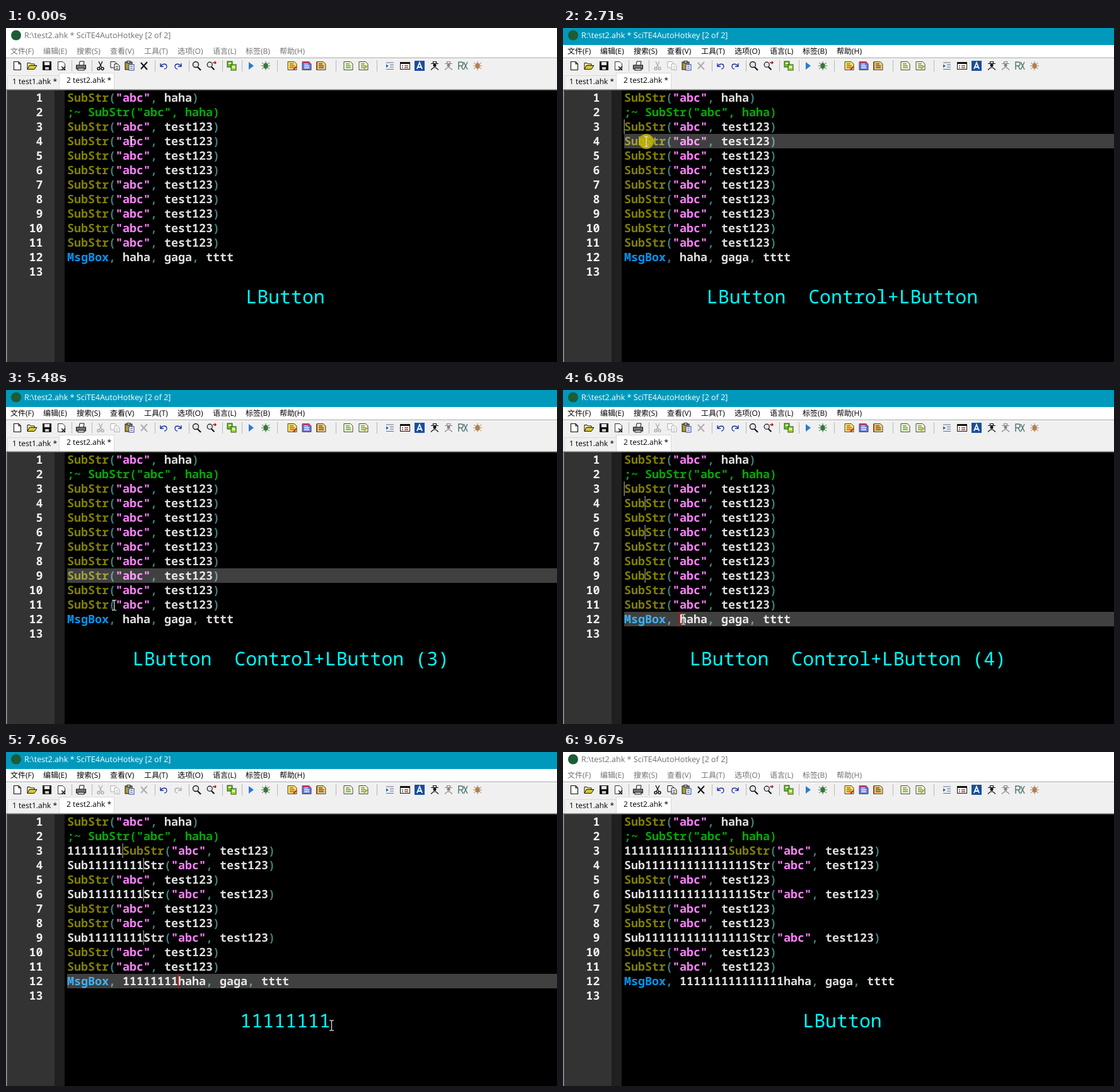
An HTML page for the animation above (9750 ms loop, 874 by 530 pixels).

```html
<!DOCTYPE html>
<html lang="zh-CN">
<head>
<meta charset="utf-8">
<title>Multi-caret editing</title>
<style>
  html, body { margin: 0; width: 100%; height: 100%; overflow: hidden; background: #000; }
  svg { display: block; width: 874px; height: 530px; }
  text { white-space: pre; text-rendering: geometricPrecision; }
  .ui { font: 12px "Open Sans", "Noto Sans CJK SC", "Noto Sans CJK", sans-serif; }
  .title { font-size: 12.55px; }
  .code { font: 600 18.333px "Noto Sans Mono", monospace; fill: #dedede; }
  .num { text-anchor: end; fill: #f0f0f0; }
  .label { font: 29.9px "Noto Sans Mono", monospace; fill: #0ff; text-anchor: middle; }
  .fn { fill: #808000; }
  .cmd { fill: #0095ee; }
  .str { fill: #ff80ff; }
  .op { fill: #408080; }
  .rem { fill: #00aa00; }
  #bar { fill: #fff; }
  #title, #menu { fill: #707070; }
  .active #bar { fill: #0099bc; }
  .active #title { fill: #fff; }
  .active #menu { fill: #000; }
  .edit { color: #111; }
  .undo, .redo { color: #1a2f9a; }
  .active .edit, .active.typed .redo { color: #acacac; }
</style>
</head>
<body>
<svg id="stage" viewBox="0 0 874 530">
  <rect width="874" height="530" fill="#000"/>
  <rect width="874" height="48" fill="#fff"/>
  <rect id="bar" width="874" height="27"/>
  <circle cx="16" cy="11.500" r="8" fill="#1d5c35"/>
  <text id="title" class="ui title" x="29" y="16">R:\test2.ahk * SciTE4AutoHotkey [2 of 2]</text>
  <g id="menu" class="ui"></g>
  <rect y="47" width="874" height="51" fill="#f0f0f0"/>
  <path d="M0 47.500H874" stroke="#a0a0a0"/>
  <path d="M0 48.500H874" stroke="#fff"/>
  <g id="tools"></g>
  <path d="M2.500 97V75.500H84.500V97" fill="#f0f0f0" stroke="#d9d9d9"/>
  <path d="M84.500 98V71.500H171.500V98" fill="#fff" stroke="#d9d9d9"/>
  <g class="ui">
    <text x="10" y="89">1 test1.ahk *</text>
    <text x="96" y="87">2 test2.ahk *</text>
  </g>
  <rect x="2" y="99" width="75" height="431" fill="#333"/>
  <rect x="77" y="99" width="16" height="431" fill="#202020"/>
  <path d="M.5 530V97.500H874" fill="none" stroke="#a0a0a0"/>
  <path d="M1.500 530V98.500H874" fill="none" stroke="#696969"/>
  <g id="code"></g>
  <rect id="row" x="97" width="777" height="23" fill="#fff" fill-opacity=".25"/>
  <g id="carets"></g>
  <text id="label" class="label" x="443" y="437"></text>
  <circle id="press" r="12" fill="#c4b800" fill-opacity=".85"/>
  <path id="mouse" d="M-3.500-8H-1L0-7L1-8H3.500M0-7V7M-3.500 8H-1L0 7L1 8H3.500" fill="none" stroke="#e8e8e8" stroke-width="1.200"/>
</svg>
<script>
const $ = id => document.getElementById(id);
const LOOP = 9750, ROW = 23, TOP = 99, LEFT = 97, CHAR = 11;

// [first, last, count]: runs of evenly spaced screen updates, on a 10 ms clock
const ticks = [[0, 0, 1], [200, 640, 4], [950, 950, 1], [1250, 1440, 2], [1760, 2710, 7],
  [2900, 3810, 7], [3970, 4470, 4], [4770, 5760, 7], [5930, 6840, 7], [7010, 8000, 7],
  [8150, 8300, 2], [8470, 8470, 1], [8800, 9290, 4], [9670, 9670, 1]
].flatMap(([a, b, n]) => Array.from({ length: n },
  (_, i) => Math.floor((a + (b - a) * i / Math.max(1, n - 1)) / 10) * 10));

// [time, x, y] of the mouse
const path = [[53, 199, 180], [640, 101, 154], [1100, 101, 154], [1440, 106, 181], [1600, 106, 181],
  [2390, 132, 180], [2900, 132, 180], [3650, 136, 226], [3970, 136, 226], [4300, 136, 304],
  [4470, 136, 290], [4770, 136, 290], [4930, 134, 295], [5100, 134, 295], [5590, 190, 364],
  [6230, 191, 364], [6690, 496, 402], [6840, 496, 402], [8000, 532, 458], [8150, 532, 495],
  [8470, 532, 495], [9120, 540, 516], [9280, 545, 550]];

// Each click adds a caret; held is how long the press marker shows
const clicks = [
  { at: 950, line: 3, col: 0, held: 0 },
  { at: 2550, line: 4, col: 3, held: 340 },
  { at: 3650, line: 6, col: 3, held: 310 },
  { at: 4930, line: 9, col: 3, held: 160 },
  { at: 5760, line: 12, col: 8, held: 160 }
];
const typeStart = ticks.indexOf(6840) - 3, typeMax = 15;

const call = 'SubStr("abc", test123)';
const source = ['SubStr("abc", haha)', ';~ SubStr("abc", haha)', ...Array(9).fill(call), 'MsgBox, haha, gaga, tttt', ''];

function tokenClass(s) {
  if (s[0] === ';') return 'rem';
  if (s[0] === '"') return 'str';
  if (s === 'SubStr') return 'fn';
  if (s === 'MsgBox') return 'cmd';
  return /^[(),]$/.test(s) ? 'op' : '';
}

const paint = line => line.split(/(;.*|"[^"]*"|SubStr|MsgBox|[(),])/).filter(Boolean)
  .map(s => `<tspan class="${tokenClass(s)}">${s}</tspan>`).join('');

const rowTop = line => TOP + ROW * (line - 1);

function buildMenu() {
  const names = ['文件(F)', '编辑(E)', '搜索(S)', '查看(V)', '工具(T)', '选项(O)', '语言(L)', '标签(B)', '帮助(H)'];
  const xs = [7, 59, 112, 165, 219, 272, 328, 380, 434];
  $('menu').innerHTML = names.map((s, i) => `<text x="${xs[i]}" y="41">${s}</text>`).join('');
}

function buildTools() {
  const line = (d, color = '#111', w = 1, fill = 'none') =>
    `<path d="${d}" fill="${fill}" stroke="${color}" stroke-width="${w}"/>`;
  const box = (x, y, w, h, fill, extra = '') => `<rect x="${x}" y="${y}" width="${w}" height="${h}" fill="${fill}" ${extra}/>`;
  const sheet = 'M-5.500-6.500H2L5.500-3V6.500H-5.500Z';
  const page = (fill, ink) => line('M-7-6.500H3.500L7-3V6.500H-7Z', '#444', 1, fill) + line('M-4-3H2M-4 0H4M-4 3H4', ink, 1.3);
  const bug = c => line('M-6-5L6 5M6-5L-6 5M-7 0H7M0-7V7', c, 1) + `<ellipse rx="3.500" ry="4.500" fill="${c}"/>`;
  const spy = c => line('M-6-3.500H6M-2.500-4V-6.500H2.500V-4M-2 1H2M-6 6.500L-2 3H2L6 6.500', c, 1.2) + `<circle cy="-1" r="2.500" fill="${c}"/>`;
  const lens = line('M1 2L6 7', '#111', 2.2) + '<circle cx="-2" cy="-2" r="4.500" fill="#dfe8f2" stroke="#111" stroke-width="1.300"/>';
  const undo = line('M-5-4V1H0M-5 1C-2-4 5-4 5 1C5 4 3 5 1 5', 'currentColor', 1.3);
  const icons = [
    [18, line(sheet + 'M2-6.500V-3H5.500', '#111', 1.1, '#fff')],
    [41, line('M-7 5.500V-4.500H-3L-2-3H4V-1', '#111', 1, '#fff6a0') + line('M-7 5.500L-4-.5H8L4 5.500Z', '#111', 1, '#d8c840')],
    [65, box(-7, -7, 14, 14, '#111') + box(-4, -6, 8, 5, '#eee') + box(-3, 2, 6, 4, '#ccc')],
    [88, line(sheet, '#333', 1, '#fff') + line('M0 1L6 7M6 1L0 7', '#111', 1.3)],
    [119, line('M-3-1L-2-7H5L4-1', '#111', 1, '#fff') + box(-7.5, -1, 15, 6, '#777', 'stroke="#111"') + box(-5, 4, 10, 3, '#eee', 'stroke="#111"')],
    [150, line('M-3-7L2 3M3-7L-2 3', 'currentColor', 1.3) + '<g fill="none" stroke="currentColor" stroke-width="1.500"><circle cx="-3" cy="4.500" r="2"/><circle cx="3" cy="4.500" r="2"/></g>', 'edit'],
    [173, line('M-7-6.500H0L2-4V3H-7Z', 'currentColor', 1, '#fff') + line('M-1-3H4L7 0V6.500H-1ZM1 1H5M1 4H5', 'currentColor', 1, '#fff'), 'edit'],
    [196, box(-7, -6, 11, 12, '#a99a35', 'stroke="#111"') + box(-4, -7.5, 5, 3, '#ddd', 'stroke="#111"') + box(-1, -2, 8, 9, '#fff', 'stroke="#223a90"') + line('M1 1H5M1 4H5', '#223a90')],
    [219, line('M-5-5L5 6M5-6L-5 5', 'currentColor', 2), 'edit'],
    [250, undo, 'undo'],
    [273, `<g transform="scale(-1 1)">${undo}</g>`, 'redo'],
    [303, lens],
    [326, `<g transform="translate(-1 0) scale(.9)">${lens}</g>` + line('M2-5H7M5-7L7-5L5-3', '#b01818', 1.5)],
    [358, box(-7, -7, 8, 9, '#72c030', 'stroke="#285010"') + box(-1, -2, 8, 9, '#a5d840', 'stroke="#285010"') + line('M-5-4H-1M1 2H5', '#fff', 2)],
    [388, '<path d="M-3-6L5 0L-3 6Z" fill="#287ad2"/>'],
    [412, bug('#39763a')],
    [454, page('#f6e36a', '#b35a20') + line('M2 6L7 1', '#c22', 2)],
    [477, page('#6878d8', '#fff') + line('M-7-5H5', '#c04070', 3)],
    [500, page('#e8ce80', '#7a4018') + line('M-7-6V7', '#8a4b20', 2)],
    [543, page('#fbfbdc', '#4a9a40')],
    [567, page('#fbfbdc', '#4a9a40') + line('M1 5L6 0', '#c79b20', 2)],
    [609, line('M-6-5H6M0-1.500H6M0 2H6M-6 5.500H6', '#58708c', 1.2) + '<path d="M-6-2.500L-2 .3L-6 3Z" fill="#2860c0"/>'],
    [633, box(-7.5, -5.5, 15, 11, '#fff', 'stroke="#111"') + line('M-7-4H7', '#111', 2) + line('M-5 0H-3M-1 0H5M-5 3H-3M-1 3H5', '#a33', 1.4)],
    [656, box(-8, -8, 16, 16, '#174f9e') + line('M-4 5L0-5L4 5M-2.500 2H2.500', '#fff', 1.8)],
    [680, spy('#111')],
    [702, spy('#858585')],
    [725, line('M-7 6V-6H-3Q0-6 0-3Q0 0-3 0H-7M-3 0L0 6', '#4e7774', 1.5) + line('M1-6L7 6M7-6L1 6', '#4e7774', 1.5)],
    [748, bug('#b08050')]
  ];
  const seps = [104, 136, 236, 290, 343, 374, 430, 523, 588];
  $('tools').innerHTML = icons.map(([x, art, kind = '']) =>
    `<g transform="translate(${x} 60)" class="${kind}">${art}</g>`).join('') +
    seps.map(x => line(`M${x}.500 51V69`, '#b8b8b8')).join('');
}

function buildCode() {
  $('code').innerHTML = source.map((_, i) => {
    const y = rowTop(i + 1) + 18;
    return `<text class="code num" x="58.500" y="${y}">${i + 1}</text><text class="code line" x="${LEFT}" y="${y}"></text>`;
  }).join('');
  return [...document.querySelectorAll('.line')];
}

function mouseAt(t) {
  const i = path.findIndex(p => p[0] > t);
  if (i < 0) return path.at(-1).slice(1);
  if (!i) return path[0].slice(1);
  const [a, b] = [path[i - 1], path[i]];
  const k = (t - a[0]) / (b[0] - a[0]);
  return [1, 2].map(j => a[j] + (b[j] - a[j]) * k);
}

function labelText(n, count) {
  if (n) return '1'.repeat(n);
  if (count < 2) return 'LButton';
  const chord = 'LButton  Control+LButton';
  return count > 2 ? ` ${chord} (${count - 1})` : chord;
}

const show = (el, on) => { el.style.display = on ? '' : 'none'; };
const move = (el, [x, y]) => el.setAttribute('transform', `translate(${x.toFixed(1)} ${y.toFixed(1)})`);

function render(i) {
  const t = ticks[i];
  const active = t >= 950 && t < 9670;
  const n = Math.max(0, Math.min(typeMax, i - typeStart + 1));
  const done = clicks.filter(c => c.at <= t);
  const last = done.at(-1);

  $('stage').classList.toggle('active', active);
  $('stage').classList.toggle('typed', n > 0);
  lines.forEach((el, k) => {
    const c = clicks.find(c => c.line === k + 1);
    const s = source[k];
    el.innerHTML = paint(c ? s.slice(0, c.col) + '1'.repeat(n) + s.slice(c.col) : s);
  });

  show($('row'), active);
  if (active) $('row').setAttribute('y', rowTop(last.line));

  const lastKey = n ? ticks[Math.min(i, typeStart + typeMax - 1)] : 0;
  const lit = active && Math.floor((t - Math.max(last.at, lastKey) + 40) / 530) % 2 === 0;
  $('carets').innerHTML = lit ? done.map(c =>
    `<rect x="${LEFT + CHAR * (c.col + n) - 0.5}" y="${rowTop(c.line)}" width="1.500" height="${ROW}" fill="${c === last ? '#f00' : '#808080'}"/>`).join('') : '';

  $('label').textContent = labelText(active ? n : 0, active ? done.length : 0);

  const pos = mouseAt(t);
  move($('mouse'), pos);
  move($('press'), pos);
  show($('mouse'), t < 9290);
  show($('press'), active && t < last.at + last.held);
}

buildMenu();
buildTools();
const lines = buildCode();
const start = performance.now();
let shown = -1;

function frame() {
  const t = (performance.now() - start) % LOOP;
  const i = ticks.findLastIndex(k => k <= t);
  if (i !== shown) render(shown = i);
  requestAnimationFrame(frame);
}
frame();
</script>
</body>
</html>
```
